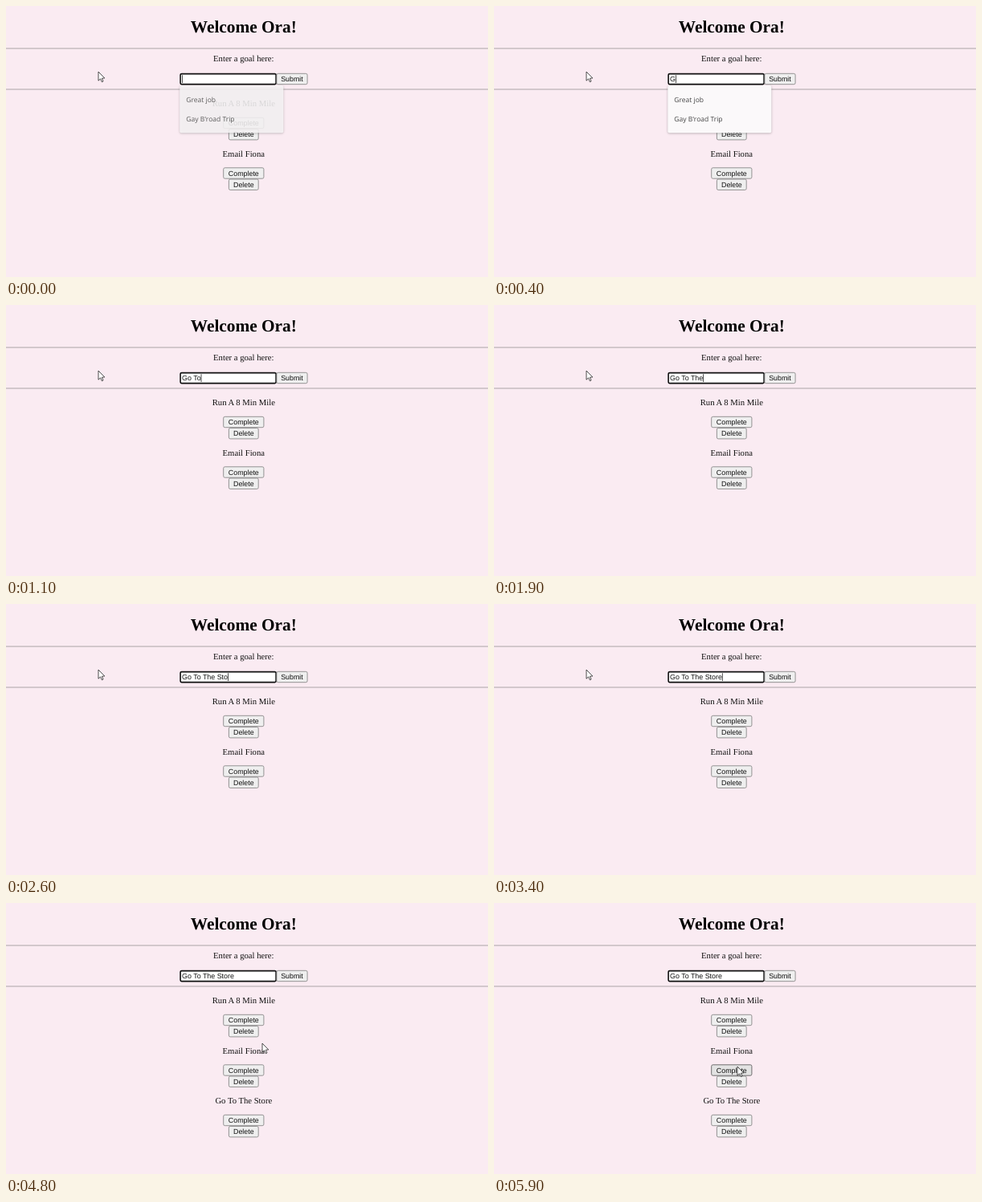
These frames come from a looping animation (600x338 px, 6 s). An HTML page with a canvas:

```html
<!DOCTYPE html>
<html lang="en">
<head>
<meta charset="utf-8">
<title>Goal list</title>
<style>
html, body { margin: 0; width: 100%; height: 100%; overflow: hidden; background: #faebf2; }
canvas { display: block; }
</style>
</head>
<body>
<canvas id="stage" width="600" height="338"></canvas>
<script>
const ctx = document.getElementById('stage').getContext('2d');
ctx.textRendering = 'geometricPrecision';

const LOOP = 6000, STEP = 100, MID = 295.8;
const SERIF = '"Liberation Serif", serif';
const SANS = '"Liberation Sans", sans-serif';
const GOAL = 'Go To The Store';

// Time at which each character of GOAL is typed
const KEYS = [300, 500, 700, 800, 1000, 1300, 1500, 1700, 1900, 2300, 2400, 2500, 2600, 2900, 3100];
const ADDED = 3500;
const BLINK = 530;

// Pointer tip: time, x, y
const PATH = [[4000, 115, 82], [4700, 317, 172], [4800, 319, 175], [5300, 312, 190], [5900, 303, 204]];

const clamp = v => Math.max(0, Math.min(1, v));
const smooth = v => v * v * (3 - 2 * v);

function text(str, x, y, font, color = '#111', align = 'center') {
  ctx.font = font;
  ctx.fillStyle = color;
  ctx.textAlign = align;
  ctx.fillText(str, x, y);
}

function box(x, y, w, h, r, fill, stroke, line) {
  ctx.beginPath();
  ctx.roundRect(x, y, w, h, r);
  ctx.fillStyle = fill;
  ctx.fill();
  if (!stroke) return;
  ctx.strokeStyle = stroke;
  ctx.lineWidth = line;
  ctx.stroke();
}

function button(label, cx, cy, w, hover) {
  box(cx - w / 2, cy - 6.7, w, 13.4, 1.8, hover ? '#e3e3e3' : '#efefef', hover ? '#505050' : '#7c7c7c', 0.8);
  text(label, cx, cy + 3.2, `8.89px ${SANS}`);
}

function goal(label, index, hover) {
  const y = index * 62.5;
  text(label, MID, y + 125.4, `10.67px ${SERIF}`);
  button('Complete', MID, y + 146, 50.2, hover);
  button('Delete', MID, y + 160.2, 36.8);
}

function input(t) {
  const count = KEYS.filter(k => k <= t).length;
  const typed = GOAL.slice(0, count);
  const lastKey = count ? KEYS[count - 1] : 0;
  box(217.1, 84.6, 119, 13, 1.5, '#fff', '#101010', 1.6);
  text(typed, 219.1, 94.2, `8.89px ${SANS}`, '#111', 'left');
  if ((t - lastKey) % (2 * BLINK) < BLINK) {
    ctx.fillStyle = '#222';
    ctx.fillRect(219.1 + ctx.measureText(typed).width, 86.2, 0.8, 9.8);
  }
}

function suggestions(t) {
  const alpha = t < 600 ? Math.min(1, 0.86 + t / 700) : clamp((800 - t) / 200);
  if (!alpha) return;
  const scale = t < 600 ? 1 : 0.96 + 0.04 * alpha;
  ctx.save();
  ctx.globalAlpha = alpha;
  ctx.translate(280.8, 128.5);
  ctx.scale(scale, scale);
  ctx.translate(-280.8, -128.5);
  ctx.shadowColor = 'rgba(0,0,0,.28)';
  ctx.shadowBlur = 3;
  ctx.shadowOffsetY = 0.8;
  box(216.3, 99, 129, 59.2, 2, '#fbf9fa');
  ctx.shadowColor = 'transparent';
  const font = '500 8.5px "Open Sans", sans-serif';
  text('Great job', 224.3, 120.2, font, '#454545', 'left');
  text("Gay B'road Trip", 224.3, 144.2, font, '#454545', 'left');
  ctx.restore();
}

function pointerAt(t) {
  if (t <= PATH[0][0]) return PATH[0].slice(1);
  const i = PATH.findIndex(p => p[0] >= t);
  const [t0, x0, y0] = PATH[i - 1], [t1, x1, y1] = PATH[i];
  let k = (t - t0) / (t1 - t0);
  if (i === 1) k = smooth(k);
  return [x0 + (x1 - x0) * k, y0 + (y1 - y0) * k];
}

function pointer([x, y]) {
  const outline = [[0, 0], [0, 11.2], [2.6, 8.8], [4.3, 12.7], [6, 12], [4.4, 8.2], [7.8, 8]];
  ctx.beginPath();
  for (const [dx, dy] of outline) ctx.lineTo(x + dx, y + dy);
  ctx.closePath();
  ctx.fillStyle = '#fff';
  ctx.fill();
  ctx.strokeStyle = '#222';
  ctx.lineWidth = 0.8;
  ctx.stroke();
}

function draw(t) {
  ctx.fillStyle = '#faebf2';
  ctx.fillRect(0, 0, 600, 338);
  text('Welcome Ora!', MID, 32.6, `bold 21.33px ${SERIF}`, '#000');
  ctx.fillStyle = '#b3abaf';
  ctx.fillRect(0, 52.4, 600, 1.1);
  ctx.fillRect(0, 103.4, 600, 1.1);
  text('Enter a goal here:', MID, 69.2, `10.67px ${SERIF}`);

  const tip = pointerAt(t);
  const hover = Math.abs(tip[0] - MID) < 25 && Math.abs(tip[1] - 208.5) < 7;
  input(t);
  button('Submit', 356, 91, 38.2);
  goal('Run A 8 Min Mile', 0);
  goal('Email Fiona', 1, hover);
  if (t >= ADDED) goal(GOAL, 2);
  suggestions(t);
  pointer(tip);
}

function tick() {
  draw(Math.floor(performance.now() % LOOP / STEP) * STEP);
  requestAnimationFrame(tick);
}
tick();
</script>
</body>
</html>
```
